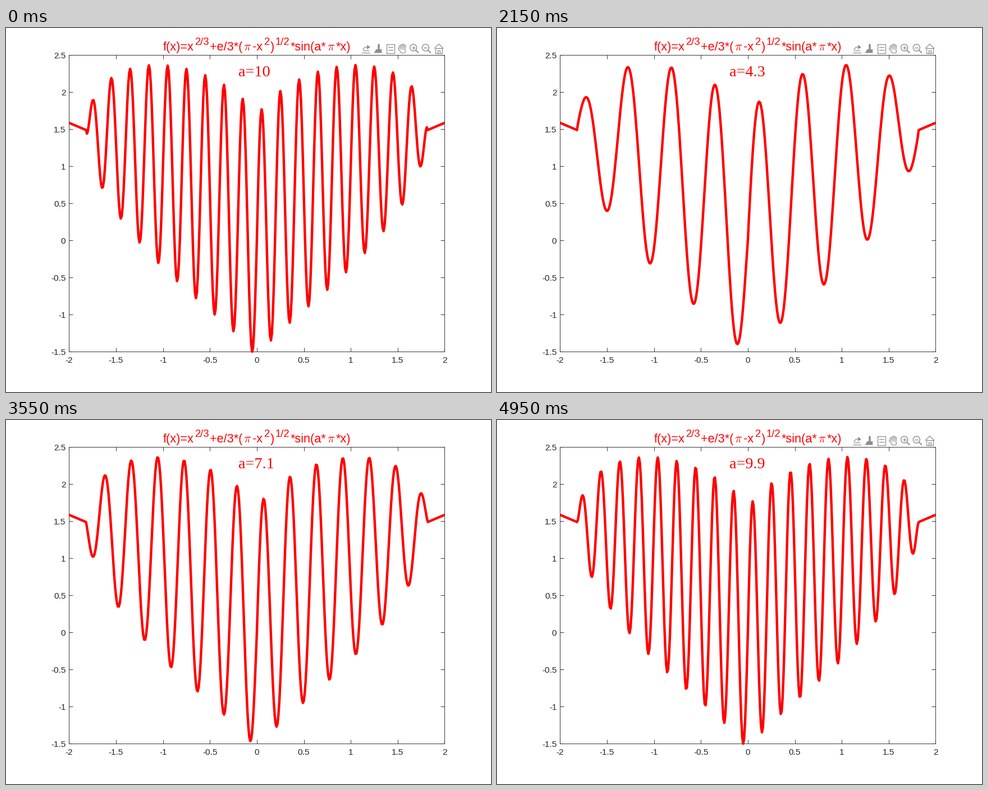
Animation of 864 by 648 pixels, one loop 5000 ms. Source, as a matplotlib script:

```python
import numpy as np
import matplotlib.pyplot as plt
from matplotlib.animation import FuncAnimation
from matplotlib.patches import Circle, Polygon

W, H = 864, 648
FRAMES, INTERVAL = 100, 50
SCALE = W / 560            # screen pixels per point
RED, INK, GREY = "#ff0000", "#262626", "#8e8e8e"
LEFT, RIGHT, TOP, BOTTOM = 112.4, 781.4, 48.4, 576.4
XMIN, XMAX, YMIN, YMAX = -2, 2, -1.5, 2.5
TOOLBAR_SHOWN = [(0, 10), (43, 47), (83, FRAMES)]
FADE = 3

# At 72 dpi one point is one pixel
fig = plt.figure(figsize=(W / 72, H / 72), dpi=72, facecolor="white")

ax = fig.add_axes([LEFT / W, 1 - BOTTOM / H,
                   (RIGHT - LEFT) / W, (BOTTOM - TOP) / H])
ax.set(xlim=(XMIN, XMAX), ylim=(YMIN, YMAX),
       xticks=np.arange(XMIN, XMAX + 0.1, 0.5),
       yticks=np.arange(YMIN, YMAX + 0.1, 0.5))
ax.tick_params(direction="in", length=6.7, width=0.9, color=INK,
               top=True, right=True, labelbottom=False, labelleft=False)
for spine in ax.spines.values():
    spine.set(color=INK, linewidth=0.9)

# Overlay in pixel coordinates, y pointing down
page = fig.add_axes([0, 0, 1, 1])
page.set(xlim=(0, W), ylim=(H, 0))
page.axis("off")
page.patch.set_visible(False)


def write(x, y, text, size, color=RED, font="Liberation Sans", ha="left"):
    return page.text(x, y, text, fontsize=size, color=color, family=font,
                     ha=ha, va="baseline", math_fontfamily="cm")


def draw_tick_labels():
    size = 10 * SCALE
    for v in ax.get_xticks():
        x = np.interp(v, (XMIN, XMAX), (LEFT, RIGHT))
        write(x, BOTTOM + 20, f"{v:g}", size, INK, ha="center")
    for v in ax.get_yticks():
        y = np.interp(v, (YMIN, YMAX), (BOTTOM, TOP))
        write(LEFT - 6, y + 5.2, f"{v:g}", size, INK, ha="right")


def draw_title():
    """Set the formula piece by piece and centre it; ^ raises a piece."""
    pieces = "f(x)=x ^2/3 +e/3*( $\\pi$ -x ^2 ) ^1/2 *sin(a* $\\pi$ *x)"
    gap, x, run = 1.6, 0, []
    for piece in pieces.split():
        raised = piece.startswith("^")
        text = write(x, 30.3 if raised else 40.3, piece.lstrip("^"),
                     18.5 if raised else 14 * SCALE)
        x += text.get_window_extent().width + gap
        run.append(text)
    start = (LEFT + RIGHT - x + gap) / 2
    for text in run:
        text.set_x(text.get_position()[0] + start)


def draw_toolbar():
    parts = []
    middle = 36.5
    export, brush, tip, hand, plus, minus, home = np.linspace(641, 771, 7)

    def stroke(cx, *points, lw=1.3, color=GREY):
        x, y = np.transpose(points)
        parts.extend(page.plot(cx + x, middle + y, color=color, lw=lw,
                               solid_capstyle="round"))

    def fill(cx, *points):
        shape = Polygon(np.add(points, (cx, middle)), color=GREY, lw=0)
        parts.append(page.add_patch(shape))

    def box(cx, w, top, bottom):
        stroke(cx, (-w, top), (w, top), (w, bottom), (-w, bottom), (-w, top))

    def bar(cx, w, y):
        stroke(cx, (-w, y), (w, y))

    bar(export, 7, 7)
    bar(export, 5, 3.5)
    stroke(export, (-5, 2), (-2, -2), (3, -2.5))
    fill(export, (2, -6.5), (8, -2.5), (2, 1.5))

    stroke(brush + 1, (0, -7), (0, 0), lw=3.5)
    bar(brush + 1, 5, 1)
    fill(brush + 1, (-5, 2.5), (5, 2.5), (6, 8), (-8, 8))

    box(tip + 1, 7, -8, 8)
    for y in (-2.5, 2.5):
        bar(tip + 1, 4, y)

    # Thick grey fingers with thinner white ones on top leave an outline
    for color, extra in ((GREY, 2.4), ("white", 0)):
        for i in range(4):
            dx = i - 1.5
            stroke(hand, (3 * dx, abs(dx - 0.3) * 1.8 - 7), (2 * dx, 4),
                   lw=1.4 + extra, color=color)
        stroke(hand, (-6, 0.5), (-1, 5.5), lw=1.4 + extra, color=color)
        stroke(hand, (-1, 4.5), (2, 4.5), lw=5 + extra, color=color)

    for cx in (plus, minus):
        ring = Circle((cx - 2, middle - 1.5), 6, fill=False, ec=GREY, lw=1.4)
        parts.append(page.add_patch(ring))
        stroke(cx, (2.5, 3), (7, 7.5), lw=2)
        bar(cx - 2, 3, -1.5)
    stroke(plus - 2, (0, -4.5), (0, 1.5))

    stroke(home, (-8, 0), (0, -8), (8, 0))
    box(home, 6, -1, 8)
    box(home, 2, 3, 8)
    return parts


def toolbar_alpha(n):
    away = min(max(start - n, n - end, 0) for start, end in TOOLBAR_SHOWN)
    return max(0, 1 - away / FADE)


draw_tick_labels()
draw_title()
toolbar = draw_toolbar()
label = write(413.6, 85.7, "", 28.3, font="Liberation Serif")

x = np.linspace(XMIN, XMAX, 401)
base_curve = np.cbrt(x ** 2)
envelope = 0.9 * np.sqrt(np.maximum(3.3 - x ** 2, 0))
curve, = ax.plot(x, base_curve, color=RED, lw=4.4, clip_on=False, zorder=5,
                 solid_capstyle="butt", solid_joinstyle="round")


def update(n):
    a = (n or FRAMES) / 10
    curve.set_ydata(base_curve + envelope * np.sin(a * np.pi * x))
    label.set_text(f"a={a:g}")
    for part in toolbar:
        part.set_alpha(toolbar_alpha(n))
    return [curve, label, *toolbar]


anim = FuncAnimation(fig, update, frames=FRAMES, interval=INTERVAL,
                     repeat=True, repeat_delay=0)
plt.show()
```
